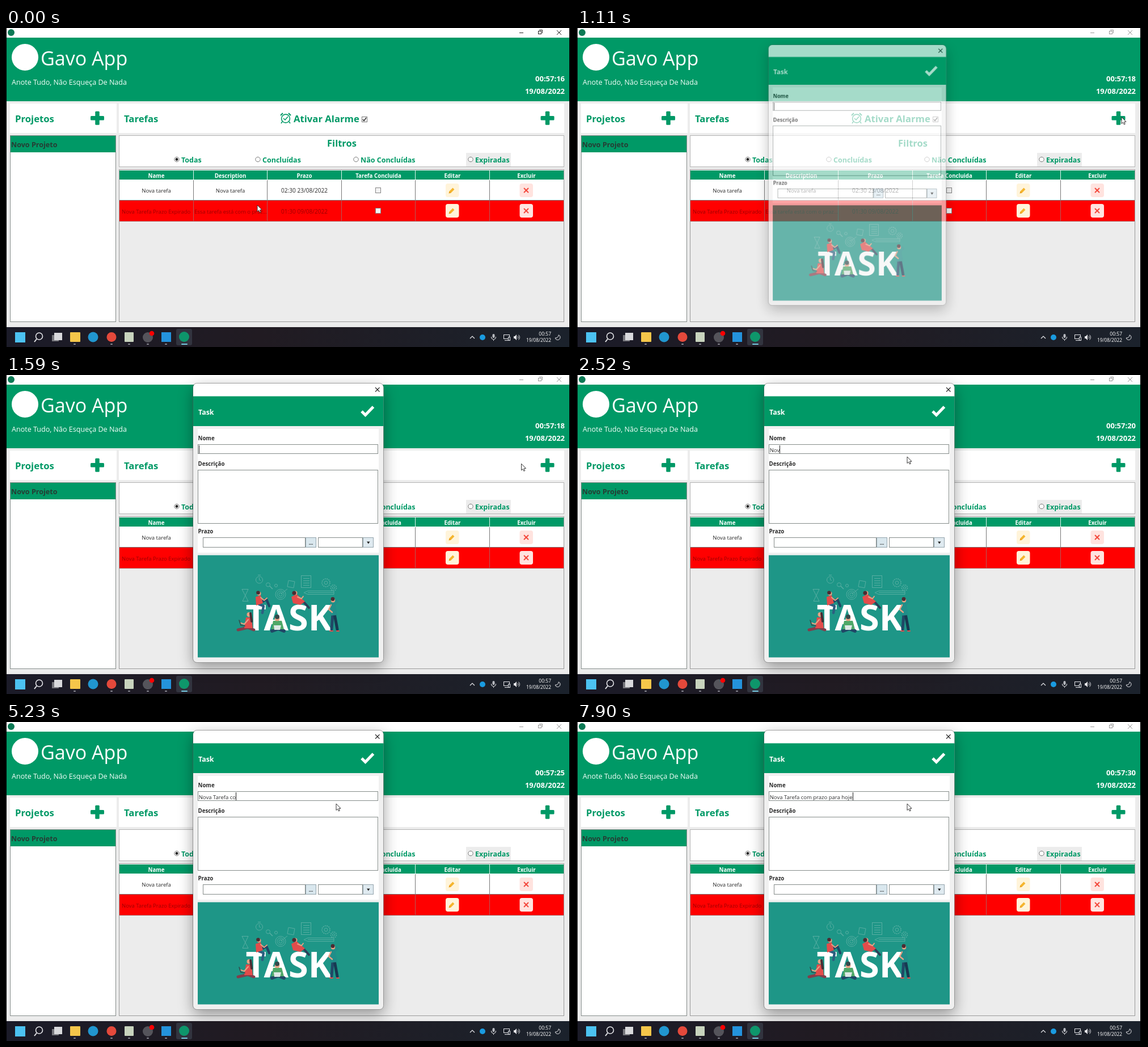
Write an HTML page with a canvas that moves like this. It is 996x562 px and loops after 8000 ms.

```html
<!DOCTYPE html>
<html lang="pt">
<head>
<meta charset="utf-8">
<title>Tarefas</title>
<style>
html, body { margin: 0; width: 100%; height: 100%; overflow: hidden; background: #000; }
canvas { display: block; }
</style>
</head>
<body>
<canvas id="stage" width="996" height="562"></canvas>
<script>
const W = 996, H = 562, LOOP = 8000;
const GREEN = '#009966', INK = '#2b2b2b', FONT = '"Open Sans", "Noto Sans", sans-serif';
const screen = document.getElementById('stage').getContext('2d');
const layer = document.createElement('canvas');
layer.width = W;
layer.height = H;
const dialogCtx = layer.getContext('2d');
let c = screen;

const TICKS = [550, 1080, 1680, 2240, 2780, 3300, 3870, 4560, 5230, 5800, 6360, 6920, 7440, 7780];
const NAME = 'Nova Tarefa com prazo para hoje';
const KEYS = [2340, 2430, 2520, 2640, 2880, 3300, 3640, 3720, 3780, 3870, 3930, 4650, 4970, 5030, 5290, 5470,
  5860, 6060, 6360, 6920, 7040, 7160, 7290, 7450, 7690, 7750, 7780, 7810, 7840, 7870, 7900];

// Basic drawing helpers
function box(x, y, w, h, fill, line) {
  if (fill) { c.fillStyle = fill; c.fillRect(x, y, w, h); }
  if (line) { c.strokeStyle = line; c.lineWidth = 1; c.strokeRect(x + .5, y + .5, w - 1, h - 1); }
}
function round(x, y, w, h, r, fill) {
  c.beginPath();
  c.roundRect(x, y, w, h, r);
  c.fillStyle = fill;
  c.fill();
}
function disc(x, y, r, fill) {
  c.beginPath();
  c.arc(x, y, r, 0, 7);
  c.fillStyle = fill;
  c.fill();
}
function ring(x, y, r, color, width = 1) {
  c.beginPath();
  c.arc(x, y, r, 0, 7);
  c.strokeStyle = color;
  c.lineWidth = width;
  c.stroke();
}
function trace(points) {
  c.beginPath();
  for (let i = 0; i < points.length; i += 2) c.lineTo(points[i], points[i + 1]);
}
function line(points, color, width = 1) {
  trace(points);
  c.strokeStyle = color;
  c.lineWidth = width;
  c.stroke();
}
function poly(points, fill) {
  trace(points);
  c.fillStyle = fill;
  c.fill();
}
function text(s, x, y, size, color = INK, weight = 400, align = 'left') {
  c.font = `${weight} ${size}px ${FONT}`;
  c.textAlign = align;
  c.fillStyle = color;
  c.fillText(s, x, y);
}
const bold = (s, x, y, size, color, align) => text(s, x, y, size, color, 700, align);

function plus(x, y) {
  round(x - 12, y - 3.75, 24, 7.5, 1.5, GREEN);
  round(x - 3.75, y - 12, 7.5, 24, 1.5, GREEN);
}
function radio(x, y, on) {
  disc(x, y, 4.2, '#fff');
  ring(x, y, 4.2, '#777');
  if (on) disc(x, y, 2.4, '#222');
}

function titleBar(active) {
  box(1, 0, 992, 17, '#fff');
  disc(9, 8, 6, '#0b7a55');
  const ink = active ? '#222' : '#999';
  line([905, 8.5, 912, 8.5], ink);
  box(938, 5, 6, 6, null, ink);
  line([940, 3.5, 945.5, 3.5, 945.5, 9], ink);
  line([971, 4, 979, 12], ink);
  line([979, 4, 971, 12], ink);
}

function header(now) {
  box(1, 17, 992, 112, GREEN);
  disc(33.5, 51.5, 23.5, '#fff');
  text('Gavo App', 61, 65.5, 34, '#fff');
  text('Anote Tudo, Não Esqueça De Nada', 10, 100, 12.55, '#f4fffa');
  const sec = 16 + TICKS.filter(k => k <= now).length;
  bold('00:57:' + sec, 985, 94, 13, '#fff', 'right');
  bold('19/08/2022', 985, 116, 13, '#fff', 'right');
}

function alarm(x, y) {
  ring(x, y + .5, 7.4, GREEN, 1.6);
  line([x - 9, y - 5, x - 5, y - 9], GREEN, 2.2);
  line([x + 9, y - 5, x + 5, y - 9], GREEN, 2.2);
  line([x - 6, y + 6, x - 8, y + 9], GREEN, 1.6);
  line([x + 6, y + 6, x + 8, y + 9], GREEN, 1.6);
  line([x - 4, y, x - 1, y + 3, x + 4, y - 3], GREEN, 1.5);
}

function panels() {
  box(7, 133, 188, 52, '#fff');
  bold('Projetos', 16, 166, 16.7, GREEN);
  plus(161, 158.75);
  box(199, 133, 785, 52, '#fff');
  bold('Tarefas', 208, 166, 16.7, GREEN);
  alarm(493, 159);
  bold('Ativar Alarme', 507, 166, 16.7, GREEN);
  box(627, 156, 10, 10, '#fff', '#777');
  line([629, 161, 631, 163.5, 635, 158], '#222', 1.4);
  plus(954.5, 158.75);

  box(7, 189, 187, 329, '#fff', '#858c8a');
  box(8, 190, 185, 29, GREEN);
  bold('Novo Projeto', 9, 210, 12.55, '#263c34');

  box(199, 189, 785, 56, '#fff', '#b4b4b4');
  bold('Filtros', 592, 209, 16.5, GREEN, 'center');
  box(811, 220, 79, 24, '#ececec');
  const filters = [['Todas', 301], ['Concluídas', 444], ['Não Concluídas', 617], ['Expiradas', 819]];
  filters.forEach(([label, x], i) => {
    radio(x, 231.5, i === 0);
    bold(label, x + 8, 237, 12.5, GREEN);
  });
}

function pencil(x, y) {
  line([x - 3.5, y + 3.5, x + 3, y - 3], '#f5b52e', 4);
  poly([x - 5.5, y + 5.5, x - 4.5, y + 1.8, x - 1.8, y + 4.5], '#e89b1c');
}
function cross(x, y) {
  line([x - 4, y - 4, x + 4, y + 4], '#f4483c', 2);
  line([x + 4, y - 4, x - 4, y + 4], '#f4483c', 2);
}

function table() {
  box(199, 249, 785, 269, '#ececec', '#9a9a9a');
  box(200, 250, 783, 54, '#fff');
  box(200, 251, 783, 16, GREEN);
  box(200, 304, 783, 37, '#f00');
  const heads = ['Name', 'Description', 'Prazo', 'Tarefa Concluida', 'Editar', 'Excluir'];
  const mid = i => 265 + i * 130.5;
  heads.forEach((s, i) => {
    bold(s, mid(i), 263.5, 9.7, '#fff', 'center');
    if (!i) return;
    const x = Math.round(200 + i * 130.5) - .5;
    line([x, 250, x, 268], '#e6f5ef');
    line([x, 268, x, 304], '#777');
    line([x, 304, x, 341], '#b35a5a');
  });
  line([200, 303.5, 983, 303.5], '#777');
  line([200, 340.5, 983, 340.5], '#b35a5a');
  text('Nova tarefa', mid(0), 290, 9.55, INK, 400, 'center');
  text('Nova tarefa', mid(1), 290, 9.55, INK, 400, 'center');
  text('02:30 23/08/2022', mid(2), 290, 10.1, INK, 400, 'center');
  const dark = '#9c0000';
  text('Nova Tarefa Prazo Expirado', 204, 326.5, 9.5, dark);
  text('Essa tarefa está com o praz...', 332, 326.5, 9.5, dark);
  text('01:30 09/08/2022', mid(2), 326.5, 10.1, dark, 400, 'center');
  for (const y of [286, 322]) {
    box(651, y - 5, 10, 10, '#f4f4f4', '#858585');
    round(775, y - 12, 23.5, 24, 4, '#fff4da');
    pencil(786, y);
    round(905.5, y - 12, 23.5, 24, 4, '#ffe3df');
    cross(917, y);
  }
}

function taskbar() {
  const g = c.createLinearGradient(0, 0, W, 0);
  g.addColorStop(0, '#1b1b28');
  g.addColorStop(.45, '#211b22');
  g.addColorStop(1, '#1b222c');
  box(1, 527, 992, 35, g);
  box(16, 536, 18, 18, '#4cc2f1');
  ring(58.5, 543, 6, '#e4e4e8', 1.6);
  line([54, 548, 50, 553], '#e4e4e8', 2);
  box(81, 541, 12, 11, '#77777d');
  box(85, 537, 14, 13, '#d9d9dc');
  round(113, 536, 18, 17, 1, '#f5c64a');
  disc(153.5, 544.5, 9, '#2196cf');
  disc(186, 544.5, 8.5, '#e4493b');
  round(209, 536, 16, 17, 1, '#c8d3bd');
  disc(250, 545, 9, '#55545b');
  disc(257, 538, 4.3, '#f00');
  box(274, 536, 17, 17, '#2493dc');
  round(300, 530, 28, 29, 3, '#32343f');
  disc(314, 544, 9, '#0e966b');
  round(309, 556, 11, 2, 1, '#73c7de');
  for (const x of [121, 186, 217, 250, 282]) round(x - 2, 556, 4, 2, 1, '#8d8d96');

  const pale = '#e6e6ea';
  line([818, 547, 822, 543, 826, 547], pale, 1.2);
  disc(840, 545, 5, '#1a9be0');
  round(857.5, 539, 4, 7, 2, '#b8bac0');
  line([855.5, 544, 856, 547, 859.5, 549, 863, 547, 863.5, 544], pale);
  line([859.5, 549, 859.5, 551], pale);
  box(877, 540, 11, 8, null, pale);
  line([879, 550.5, 886, 550.5], pale);
  box(885, 544, 4, 7, '#1b222c', pale);
  poly([895, 543, 897, 543, 900, 540, 900, 550, 897, 547, 895, 547], pale);
  for (const r of [3, 5.5]) {
    c.beginPath();
    c.arc(900, 545, r, -.9, .9);
    c.strokeStyle = pale;
    c.lineWidth = 1;
    c.stroke();
  }
  text('00:57', 961, 541.5, 8.5, '#fff', 400, 'right');
  text('19/08/2022', 961, 553, 8.3, '#fff', 400, 'right');
  c.beginPath();
  c.arc(972.5, 545, 4.5, -1.2, 2.9);
  c.quadraticCurveTo(974, 546, 974.1, 540.8);
  c.strokeStyle = pale;
  c.stroke();
}

// Outline icons behind the big letters
function doodles() {
  const tint = '#57aea2';
  ring(446.5, 361, 6, tint);
  line([446.5, 357, 446.5, 361, 449, 362], tint);
  line([444, 352.5, 449, 352.5], tint);
  ring(462, 369.5, 3.5, tint);
  line([465, 372, 470, 377], tint, 1.5);
  for (const r of [3, 6, 9]) ring(484, 386.5, r, tint);
  line([484, 386, 496, 377], tint);
  line([416, 377.5, 427, 377.5, 417, 398.5, 427, 398.5, 416, 377.5], tint);
  line([498, 362, 509, 364, 507, 375, 496, 373, 498, 362], tint);
  box(520, 353, 18, 22, null, tint);
  for (let y = 358; y < 374; y += 4) line([524, y + .5, 535, y + .5], tint);
  for (const [x, y, r] of [[564, 366, 7], [577.5, 375, 5]]) {
    c.setLineDash([2, 1.4]);
    ring(x, y, r, tint, 1.6);
    c.setLineDash([]);
    ring(x, y, r / 2.4, tint);
  }
  line([525, 383.5, 532, 380.5, 578, 380.5, 578, 386.5, 532, 386.5, 525, 383.5], tint);
  line([532, 383.5, 578, 383.5], tint);
  ring(476, 371, 2.5, tint);
}

function people() {
  const skin = '#e7a183', hair = '#4a2c33', navy = '#204866', red = '#e24c4b';
  c.lineJoin = c.lineCap = 'round';
  // seated on the first letter
  line([446, 403, 459, 395, 464, 407], navy, 4.5);
  line([446, 404, 454, 407, 452, 419], '#2c5f80', 4.5);
  poly([440, 391, 449, 388, 453, 402, 441, 406], red);
  line([449, 392, 455, 397, 460, 393], skin, 2);
  disc(446, 385, 3.5, skin);
  disc(444.5, 383.5, 3.3, hair);
  // reclining on the third letter
  line([516, 401, 525, 400, 534, 410], '#2d4059', 4);
  poly([503, 391, 512, 386, 527, 399, 519, 405, 506, 402], red);
  line([514, 391, 521, 394, 524, 390], skin, 2);
  disc(510, 384, 3.5, skin);
  disc(508, 384, 3.6, hair);
  // with a notebook, left
  line([409, 449, 426, 445, 437, 449], '#823d4a', 5);
  poly([423, 427, 433, 427, 435, 446, 420, 446], red);
  line([427, 431, 420, 439, 414, 437], skin, 2.2);
  line([411, 432, 414, 441, 421, 442], '#35494b', 1.6);
  disc(428.5, 422, 4, skin);
  line([431, 420, 433, 434], hair, 4);
  // cross-legged in front
  line([469, 451, 480, 447, 490, 451], navy, 6);
  poly([471, 433, 486, 433, 490, 448, 468, 448], '#4fa868');
  disc(478, 429, 4.5, skin);
  disc(478, 426, 4, '#35494b');
  poly([472, 441, 485, 441, 483, 449, 473, 449], '#dce8e5');
  // standing, right
  line([576, 421, 574, 448], navy, 5);
  line([579, 421, 584, 448], '#173951', 5);
  poly([571, 402, 580, 401, 584, 423, 571, 424], '#208e89');
  line([573, 405, 569, 413, 575, 418], skin, 2.4);
  line([580, 404, 585, 399, 579, 396], '#208e89', 3);
  disc(576.5, 397, 3.7, skin);
  disc(576, 394.7, 3.4, hair);
  line([571, 451, 576, 451], red, 2);
  line([583, 451, 587, 451], red, 2);
  c.lineJoin = 'miter';
  c.lineCap = 'butt';
}

function picture() {
  box(338, 317.5, 319, 180, '#1e9687');
  doodles();
  bold('TASK', 422.5, 449.5, 63, '#fff');
  people();
}

function dialog(now) {
  c.clearRect(0, 0, W, H);
  c.save();
  c.shadowColor = 'rgba(0,0,0,.38)';
  c.shadowBlur = 26;
  c.shadowOffsetY = 8;
  round(330, 15, 335.5, 491.5, 7, '#f0f0f0');
  c.restore();
  round(330, 15, 335.5, 23, [7, 7, 0, 0], '#fff');
  c.beginPath();
  c.roundRect(329.5, 14.5, 336, 492, 7);
  c.strokeStyle = 'rgba(90,90,90,.5)';
  c.lineWidth = 1;
  c.stroke();
  line([651, 22, 658.5, 29.5], '#222', 1.1);
  line([658.5, 22, 651, 29.5], '#222', 1.1);
  box(330, 37.5, 335.5, 52.5, GREEN);
  bold('Task', 339, 70, 12.4, '#fff');
  line([627, 64, 633.5, 70.5, 647.5, 56], '#fff', 5);

  box(338, 95, 319, 218, '#fff');
  bold('Nome', 338.5, 115, 9.7);
  bold('Descrição', 338.5, 160, 9.7);
  bold('Prazo', 338.5, 278.5, 9.7);
  box(338, 122, 318, 17, '#fff', '#858c8a');
  box(338, 167, 318, 95, '#fff', '#858c8a');
  box(347, 286, 181, 18, '#fff', '#858c8a');
  box(528, 286, 19, 18, '#d9e7ee', '#93a4ac');
  bold('...', 537.5, 298.5, 9, '#222', 'center');
  box(550, 286, 79, 18, '#fff', '#858c8a');
  box(629, 286, 19, 18, '#dfeaf0', '#93a4ac');
  poly([636, 293.5, 641.5, 293.5, 638.75, 297.5], '#222');

  const typed = NAME.slice(0, KEYS.filter(k => k <= now).length);
  text(typed, 339.7, 135.5, 9.51, '#333');
  const caret = Math.round(340 + c.measureText(typed).width);
  box(caret, 124, 1, 14, '#222');
  picture();
}

const clamp = v => Math.min(1, Math.max(0, v));
const smooth = v => v * v * (3 - 2 * v);

// Pointer stops: time, x, y
const PATH = [[0, 443, 312], [120, 443, 312], [860, 960, 157], [1110, 960, 157], [1200, 952, 158], [1420, 952, 158], [2220, 582, 144]];

function pointer(now) {
  let i = 0;
  while (i < PATH.length - 2 && now >= PATH[i + 1][0]) i++;
  const [t0, x0, y0] = PATH[i], [t1, x1, y1] = PATH[i + 1];
  const k = smooth(clamp((now - t0) / (t1 - t0)));
  c.save();
  c.translate(x0 + (x1 - x0) * k, y0 + (y1 - y0) * k);
  const shape = [0, 0, 0, 11.5, 2.6, 9.2, 4.4, 13, 6.2, 12.2, 4.6, 8.4, 8, 8.2];
  poly(shape, '#fff');
  c.closePath();
  c.strokeStyle = '#222';
  c.lineWidth = .9;
  c.stroke();
  c.restore();
}

function frame() {
  const now = performance.now() % LOOP, open = 1050;
  c = screen;
  box(0, 0, W, H, '#000');
  box(1, 128, 992, 399, '#ececec');
  titleBar(now < open);
  header(now);
  panels();
  table();
  taskbar();
  if (now >= open) {
    c = dialogCtx;
    dialog(now);
    c = screen;
    const p = 1 - (1 - clamp((now - open) / 150)) ** 2;
    const size = .81 + .19 * p;
    c.save();
    c.globalAlpha = p;
    c.translate(497.5 - 10 * (1 - p), 260.5 - 4 * (1 - p));
    c.scale(size, size);
    c.drawImage(layer, -497.5, -260.5);
    c.restore();
  }
  pointer(now);
  requestAnimationFrame(frame);
}
frame();
</script>
</body>
</html>
```
